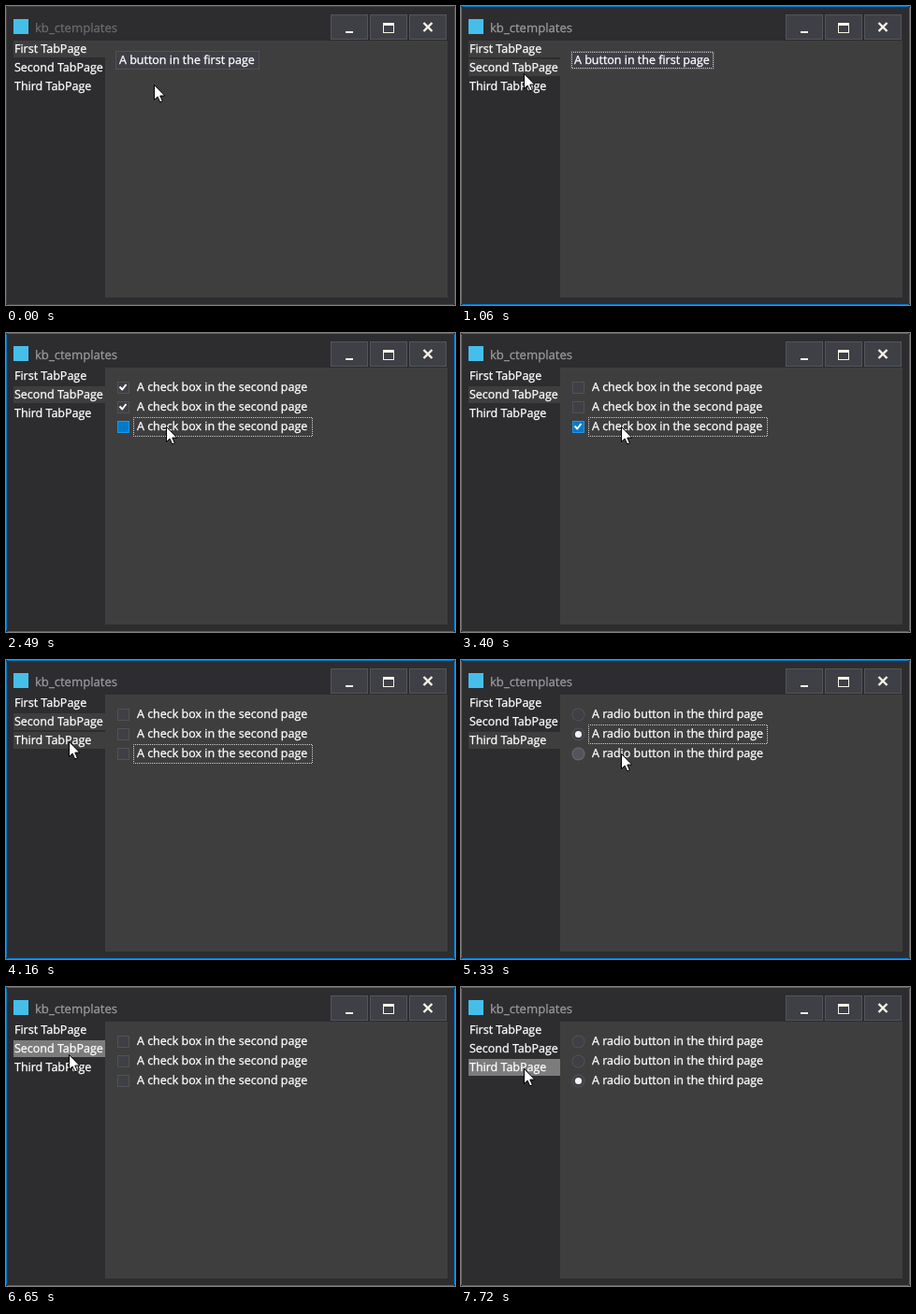
Animation of 480 by 320 pixels, one loop 7.9 s. Source, as an HTML page with a canvas:

```html
<!DOCTYPE html>
<html>
<head>
<meta charset="utf-8">
<style>
  html, body { margin: 0; width: 100%; height: 100%; overflow: hidden; background: #000; }
  canvas { display: block; }
</style>
</head>
<body>
<canvas id="stage" width="480" height="320"></canvas>
<script>
const ctx = document.getElementById('stage').getContext('2d');
const LOOP = 7900, HOLD = 140, TRAVEL = 350;
const DARK = '#2d2d30', PAGE = '#3e3e3e', FACE = '#3f3f46', EDGE = '#54545c',
      BLUE = '#007acc', LIT = '#7c7c7c', CREAM = '#f5f3e6';
const TABS = ['First TabPage', 'Second TabPage', 'Third TabPage'];

// Where the pointer rests on each control
const SPOTS = {
  start: [158, 84], button: [163, 61],
  tab0: [66, 48], tab1: [67, 72], tab2: [67, 87],
  row0: [158, 61], row1: [164, 81], row2: [171, 100]
};

// Controls in click order, with the time each press begins
const CLICKS = [
  ['button', 300], ['tab1', 1140],
  ['row0', 1670], ['row1', 2030], ['row2', 2490],
  ['row0', 2860], ['row1', 3085], ['row2', 3310],
  ['tab2', 4190], ['row0', 4620], ['row1', 5000], ['row2', 5440],
  ['tab0', 5950], ['tab1', 6510], ['tab2', 7040]
];

// The pointer leaves a control on release and reaches the next one well before pressing it
function pointer(t) {
  let from = 'start', leave = 30;
  for (const [to, down] of CLICKS) {
    if (t < down) {
      const k = Math.max(0, Math.min(1, (t - leave) / Math.min(TRAVEL, .6 * (down - leave))));
      const ease = k * k * (3 - 2 * k);
      return SPOTS[from].map((a, i) => Math.round(a + (SPOTS[to][i] - a) * ease));
    }
    from = to;
    leave = down + HOLD;
  }
  return SPOTS[from];
}

function hit([x, y], page) {
  const inside = i => i >= 0 && i < 3;
  const tab = Math.floor((y - 37) / 20), row = Math.floor((y - 48) / 21);
  if (x < 106) return inside(tab) ? 'tab' + tab : '';
  if (page === 0) return x >= 117 && x < 271 && row === 0 ? 'button' : '';
  return x >= 119 && x < 328 && inside(row) ? 'row' + row : '';
}

function stateAt(t) {
  const s = { page: 0, checks: [], radio: -1, focus: '', pressed: '', active: t >= CLICKS[0][1] };
  for (const [id, down] of CLICKS) {
    if (t < down) break;
    const i = +id.slice(-1), isTab = id.startsWith('tab');
    if (!isTab) s.focus = id;
    if (t < down + HOLD) { s.pressed = id; break; }
    if (isTab) { s.page = i; s.focus = ''; }
    else if (s.page === 1) s.checks[i] = !s.checks[i];
    else if (s.page === 2) s.radio = i;
  }
  s.mouse = pointer(t);
  s.hover = hit(s.mouse, s.page);
  return s;
}

function fill(color, x, y, w, h) {
  ctx.fillStyle = color;
  ctx.fillRect(x, y, w, h);
}

function box(face, edge, x, y, w, h) {
  fill(edge, x, y, w, h);
  fill(face, x + 1, y + 1, w - 2, h - 2);
}

// A hairline stroke gives the slightly heavier look of screen-hinted text
function text(str, x, y, color = '#fff', size = 12.5) {
  ctx.font = size + 'px "Open Sans", "Noto Sans", sans-serif';
  ctx.fillStyle = ctx.strokeStyle = color;
  ctx.lineWidth = .3;
  ctx.fillText(str, x, y);
  ctx.strokeText(str, x, y);
}

function line(color, width, ...points) {
  ctx.strokeStyle = color;
  ctx.lineWidth = width;
  ctx.beginPath();
  points.forEach(p => ctx.lineTo(...p));
  ctx.stroke();
}

function disc(color, x, y, r) {
  ctx.fillStyle = color;
  ctx.beginPath();
  ctx.arc(x, y, r, 0, 7);
  ctx.fill();
}

function focusRect(x, y, w, h) {
  ctx.strokeStyle = '#d0d0d0';
  ctx.lineWidth = 1;
  ctx.setLineDash([1, 1]);
  ctx.lineDashOffset = .5;
  ctx.strokeRect(x + .5, y + .5, w - 1, h - 1);
  ctx.setLineDash([]);
}

function drawWindow(active) {
  fill('#000', 0, 0, 480, 320);
  ctx.fillStyle = active ? BLUE : '#434346';
  ctx.beginPath();
  ctx.roundRect(0, 0, 480, 320, 2);
  ctx.fill();
  fill(DARK, 1, 1, 478, 318);
  fill('#45bfea', 8, 14, 16, 16);
  text('kb_ctemplates', 31, 28, active ? '#999' : '#6a6a6a', 13.1);
  for (let i = 0; i < 3; i++) box(FACE, EDGE, 347 + 42 * i, 9, 40, 27);
  fill(CREAM, 363, 27, 8, 2);
  fill(CREAM, 403, 18, 12, 11);
  fill(FACE, 404, 21, 10, 7);
  line(CREAM, 2.4, [446.5, 18], [455.5, 27]);
  line(CREAM, 2.4, [455.5, 18], [446.5, 27]);
  fill(PAGE, 106, 37, 366, 275);
}

function drawTabs(s) {
  TABS.forEach((label, i) => {
    const id = 'tab' + i, over = s.hover === id, chosen = s.page === i;
    if (over || chosen) {
      const lit = s.pressed === id || (over && chosen);
      fill(lit ? LIT : PAGE, 8, 37 + 20 * i, 98, 18);
    }
    text(label, 9, 50 + 20 * i);
  });
}

function faceOf(s, id) {
  return s.pressed === id ? [BLUE, '#1c97ea'] : s.hover === id ? [EDGE, '#6a6a75'] : [FACE, '#515159'];
}

function drawButton(s) {
  box(...faceOf(s, 'button'), 117, 48, 154, 20);
  if (s.focus === 'button') focusRect(118, 49, 152, 18);
  text('A button in the first page', 121, 62);
}

function drawRows(s) {
  for (let i = 0; i < 3; i++) {
    const id = 'row' + i, y = 48 + 21 * i, [face, edge] = faceOf(s, id);
    if (s.page === 1) {
      box(face, edge, 119, y + 4, 13, 13);
      if (s.checks[i]) line('#fff', 2, [121.5, y + 9.5], [124.3, y + 12.5], [128.5, y + 7]);
      text('A check box in the second page', 140, y + 14);
    } else {
      disc(edge, 125.5, y + 10.5, 7);
      disc(face, 125.5, y + 10.5, 6);
      if (s.radio === i) disc('#f4f4f4', 125.5, y + 10.5, 3.6);
      text('A radio button in the third page', 140, y + 14);
    }
    if (s.focus === id) focusRect(136, y, 192, 21);
  }
}

function drawPointer([x, y]) {
  const outline = [[0, 0], [0, 16], [3.6, 12.6], [6.2, 18.4], [8.8, 17.3], [6.3, 11.6], [11.2, 11.6]];
  ctx.beginPath();
  outline.forEach(([dx, dy]) => ctx.lineTo(x + .5 + dx, y + .5 + dy));
  ctx.closePath();
  ctx.fillStyle = '#fff';
  ctx.fill();
  ctx.strokeStyle = '#000';
  ctx.lineWidth = 1;
  ctx.stroke();
}

function frame(now) {
  const s = stateAt(now % LOOP);
  ctx.textRendering = 'geometricPrecision';
  ctx.lineJoin = 'round';
  drawWindow(s.active);
  drawTabs(s);
  s.page === 0 ? drawButton(s) : drawRows(s);
  drawPointer(s.mouse);
  requestAnimationFrame(frame);
}
requestAnimationFrame(frame);
</script>
</body>
</html>
```
